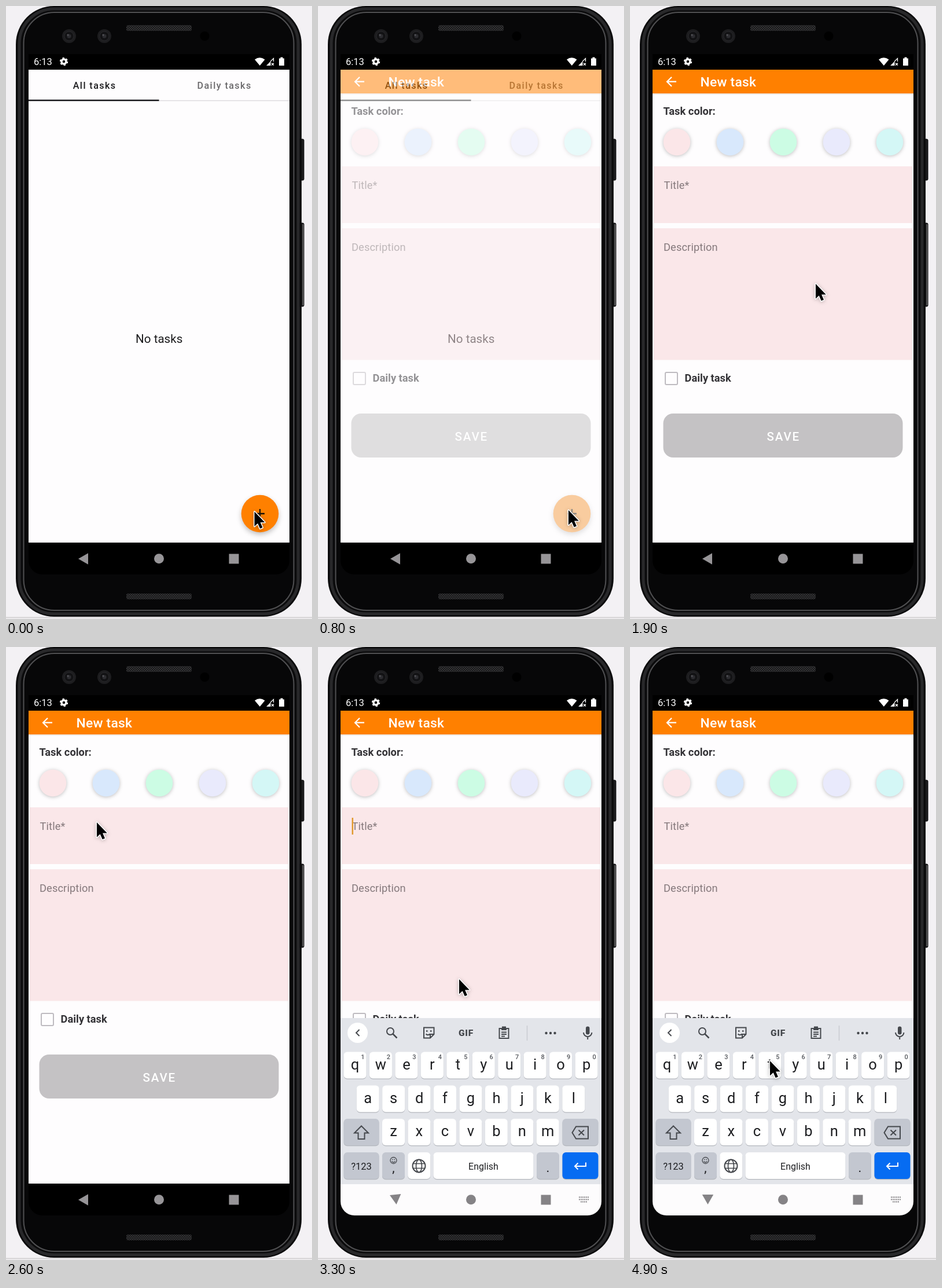
Animation, 529 px wide and 1059 px high, one loop 5 s. Source, as an HTML page:

```html
<!DOCTYPE html>
<html lang="en">
<head>
<meta charset="utf-8">
<title>Task app</title>
<style>
  html, body { margin: 0; width: 100%; height: 100%; overflow: hidden; background: #f3f1f4; }
  svg { display: block; width: 100%; height: 100%; }
  text { font-family: Roboto, sans-serif; white-space: pre; }
  .medium { font-weight: 500; }
  .bold { font-weight: 700; fill: #333236; }
  .tab { font-size: 16.1px; letter-spacing: 1.43px; }
  .hint { font-size: 18.3px; letter-spacing: .1px; fill: #85797c; }
  .mid { text-anchor: middle; }
  .line { fill: none; stroke: #45484d; stroke-width: 2; }
  .lift { filter: drop-shadow(0 1.5px 3px rgba(0, 0, 0, .25)); }
  .fab { filter: drop-shadow(0 4px 4px rgba(0, 0, 0, .24)); }
</style>
</head>
<body>
<svg viewBox="0 0 529 1059">
  <defs>
    <pattern id="mesh" width="4" height="4" patternUnits="userSpaceOnUse">
      <rect width="4" height="4" fill="#171718"/>
      <path d="M0 0h2v2h-2zM2 2h2v2h-2z" fill="#343436"/>
    </pattern>
    <clipPath id="glass"><path d="M39 83H490V958a24 24 0 0 1-24 24H63a24 24 0 0 1-24-24Z"/></clipPath>
    <g id="lens">
      <circle r="12" fill="#1d1d1f"/>
      <circle r="8" fill="#121214" stroke="#29292c"/>
      <circle r="3.5" fill="#2c2c30"/>
      <circle cx="-2" cy="-2" r="1.5" fill="#56565b"/>
    </g>
  </defs>

  <!-- Phone body -->
  <path d="M0 1056.5H529" stroke="#d3d1d4" stroke-width="2"/>
  <g fill="#1c1c1e" stroke="#050506">
    <rect x="508" y="230" width="7" height="71" rx="2"/>
    <rect x="508" y="375" width="7" height="144" rx="2"/>
  </g>
  <path d="M513.500 377V517" stroke="#78787a" stroke-width="1.500"/>
  <g fill="none">
    <rect x="17" y="0" width="494" height="1055" rx="66" fill="#0b0b0c"/>
    <rect x="23" y="5" width="482" height="1045" rx="60" stroke="#28282a" stroke-width="5"/>
    <rect x="30.500" y="11" width="467" height="1033" rx="53" fill="#070708" stroke="#505052" stroke-width="2"/>
  </g>
  <rect x="208" y="33" width="113" height="10" rx="3" fill="url(#mesh)"/>
  <rect x="208" y="1015" width="113" height="10" rx="3" fill="url(#mesh)"/>
  <use href="#lens" x="109" y="52"/>
  <use href="#lens" x="170" y="52"/>
  <circle cx="343.500" cy="52" r="8" fill="#000"/>

  <g clip-path="url(#glass)">
    <rect x="39" y="83" width="451" height="899"/>

    <!-- Status bar -->
    <g fill="#fff">
      <text x="48" y="102" font-size="16.5">6:13</text>
      <circle cx="100" cy="96" r="4" fill="none" stroke="#fff" stroke-width="3.4"/>
      <circle cx="100" cy="96" r="6" fill="none" stroke="#fff" stroke-width="2.4" stroke-dasharray="3.1 3.183"/>
      <path d="M430 92.500Q438.500 86 447.500 92.500L438.800 103ZM450 103L457.500 95.500V103ZM472 90.500h2.500v-2h4v2h2.500V103h-9Z"/>
      <path d="M457 96L462.500 90.500V96M459 98.500l4 4m0-4l-4 4" fill="none" stroke="#fff" stroke-width="1.300"/>
    </g>

    <!-- Task list -->
    <rect x="39" y="110" width="451" height="817" fill="#fefdfe"/>
    <text class="tab medium" x="115.700" y="143" fill="#1b1b1d">All tasks</text>
    <text class="tab medium" x="330.500" y="143" fill="#6a696b">Daily tasks</text>
    <path d="M264 163.500H490" stroke="#dddbde" stroke-width="1.500"/>
    <path d="M39 163H264.500" stroke="#17171a" stroke-width="2.300"/>
    <text class="mid" x="264.700" y="582" font-size="20.600" fill="#1b1b1d">No tasks</text>
    <circle class="fab" cx="439" cy="877" r="32.300" fill="#ff8000"/>
    <circle id="press" cx="439" cy="877" r="32.300" fill="#d8dde0"/>
    <path d="M431 877H447M439 869V885" stroke="#1b1205" stroke-width="2.300"/>

    <!-- New task form -->
    <g id="form">
      <rect x="39" y="110" width="451" height="817" fill="#fefdfe"/>
      <path d="M39 152H490" stroke="#eee8e8" stroke-width="2"/>
      <rect x="39" y="110" width="451" height="41" fill="#ff8000"/>
      <path d="M80 130.700H64.500M72 122.700L64 130.700L72 138.700" fill="none" stroke="#fff" stroke-width="2.200"/>
      <text class="medium" x="121.500" y="139.300" font-size="22.900" letter-spacing=".2" fill="#fff">New task</text>
      <text class="bold" x="57.500" y="188.300" font-size="18.300">Task color:</text>
      <g id="swatches"></g>
      <path d="M40.500 277H489V375H40.500ZM40.500 384H489V611.500H40.500Z" fill="#fae7e9"/>
      <text class="hint" x="58.500" y="315.500">Title*</text>
      <text class="hint" x="58" y="423">Description</text>
      <rect id="caret" x="58.500" y="295" width="2.500" height="29" fill="#e09a30"/>
      <rect x="61" y="633" width="21" height="21" rx="2" fill="none" stroke="#bebbc0" stroke-width="2"/>
      <text class="bold" x="94.500" y="649" font-size="18.300">Daily task</text>
      <rect x="57.500" y="704" width="414" height="76" rx="17" fill="#c4c2c4"/>
      <text class="medium" x="236.500" y="750.500" font-size="20.600" letter-spacing="1.800" fill="#fff">SAVE</text>
    </g>

    <!-- Keyboard -->
    <g id="keyboard">
      <rect x="39" y="641" width="451" height="288" fill="#e3e5ea"/>
      <rect x="39" y="928" width="451" height="420" fill="#fdfcfd"/>
      <circle cx="68.500" cy="666.500" r="17.500" fill="#fff"/>
      <g class="line">
        <path d="M71.500 661L66 666.500L71.500 672"/>
        <circle cx="125" cy="664" r="6"/>
        <path d="M129.500 668.500L136.500 675.500" stroke-width="2.500"/>
        <path d="M183 657.500H200.500V669L194 675.500H183ZM200 669H194V675M186.500 668.500Q190 672 193.500 668.500"/>
        <path d="M187 663.500h2.500m4.500 0h2.500" stroke-width="2.500"/>
        <path d="M313.500 659H329.500V676H313.500ZM317 661H326M317 665.500H326M317 669H326M317 672.500H323"/>
        <path d="M318 657.500H325" stroke-width="4"/>
        <path d="M361.500 654V680" stroke="#c9ccd1" stroke-width="1.500"/>
        <path d="M459 666a7.200 7.200 0 0 0 14.400 0M466.200 673V678"/>
      </g>
      <rect x="463" y="655.500" width="6.500" height="14" rx="3.250" fill="#45484d"/>
      <g fill="#45484d">
        <circle cx="394.500" cy="667" r="2.200"/><circle cx="402" cy="667" r="2.200"/><circle cx="409.500" cy="667" r="2.200"/>
      </g>
      <text class="mid" x="256" y="672" font-size="15.500" font-weight="900" letter-spacing=".8" fill="#45484d">GIF</text>
      <g id="keys"></g>
      <g class="line">
        <path d="M75 827.500L87 839.500H80.500V850H69.500V839.500H63Z"/>
        <path d="M446 828.500H467V849.500H446L439.500 839ZM450.500 834.500L460 843.500M460 834.500L450.500 843.500"/>
        <circle cx="130.500" cy="887" r="5.500" stroke-width="1.300"/>
        <path d="M127.500 888.500Q130.500 892 133.500 888.500M128 885.500h1.500m2 0h1.500" stroke-width="1.300"/>
        <circle cx="174.500" cy="896.500" r="11"/>
        <ellipse cx="174.500" cy="896.500" rx="5" ry="11" stroke-width="1.700"/>
        <path d="M164.500 892.500H184.500M164.500 900.500H184.500" stroke-width="1.700"/>
        <path d="M463 890.500V897H444M449.500 891.500L444 897L449.500 902.500" stroke="#fff"/>
      </g>
    </g>

    <!-- Navigation -->
    <g id="nav">
      <path id="back" d="M-9.500 0L7.500-9.700V9.700Z"/>
      <circle cx="264.500" cy="954.800" r="8.500"/>
      <rect x="385.500" y="946.500" width="17" height="17"/>
      <path id="switcher" d="M451 950.500H468M451 954.500H468M454 958.500H465" fill="none" stroke="#858386" stroke-width="2" stroke-dasharray="2 1"/>
    </g>
  </g>

  <path id="pointer" class="lift" d="M0 0V25.500L5.700 20.200L9.700 29.300L14 27.500L10.100 18.500H17.800Z"
    stroke="#fff" stroke-width="3" paint-order="stroke" stroke-linejoin="round"/>
</svg>

<script>
  const $ = id => document.getElementById(id);

  $("swatches").innerHTML = ["#fbe6e8", "#d8e8fc", "#ccfce4", "#e9eafc", "#d4f7f6"]
    .map((c, i) => `<circle class="lift" cx="${81 + 92 * i}" cy="235" r="23.3" fill="${c}"/>`).join("");

  const GRAY = "#c3c7d0";

  function key(x, y, w, label = "", fill = "#fff", size = 25.5, drop = 30) {
    return `<rect x="${x}" y="${y + 1.2}" width="${w}" height="46" rx="6" fill="#b4b7bd"/>
      <rect x="${x}" y="${y}" width="${w}" height="46" rx="6" fill="${fill}"/>
      <text class="mid" x="${x + w / 2}" y="${y + drop}" font-size="${size}" fill="#1d1e21">${label}</text>`;
  }

  function letters(row, x, y) {
    return [...row].map((c, i) => key(x + 44.45 * i, y, 39, c)).join("");
  }

  $("keys").innerHTML =
    letters("qwertyuiop", 44.5, 699.5) + letters("asdfghjkl", 66.7, 757.5) + letters("zxcvbnm", 111, 815) +
    [..."1234567890"].map((c, i) =>
      `<text class="mid medium" x="${77.5 + 44.45 * i}" y="712" font-size="11" fill="#55585d">${c}</text>`).join("") +
    key(44.5, 815, 61, "", GRAY) + key(422.5, 815, 62, "", GRAY) +
    key(44.5, 873, 61, "?123", GRAY, 16.5, 30) + key(111, 873, 39, ",", GRAY, 22, 34) +
    key(155.3, 873, 39) + key(199.5, 873, 173, "English", "#fff", 16, 29.5) +
    key(378, 873, 39, ".", GRAY, 22, 34) + key(422.5, 873, 62, "", "#066cf2");

  // Linear interpolation through [time, value, ...] points
  function track(points, t) {
    const n = points.findIndex(p => p[0] > t);
    if (n === 0) return points[0].slice(1);
    if (n < 0) return points.at(-1).slice(1);
    const a = points[n - 1], b = points[n], k = (t - a[0]) / (b[0] - a[0]);
    return a.slice(1).map((v, i) => v + (b[i + 1] - v) * k);
  }

  const pointerPath = [
    [0, 429.5, 873.5], [200, 433, 871], [1500, 433, 871], [1600, 422, 815], [1700, 394, 690],
    [1800, 356, 570], [1900, 321, 480], [2000, 287, 431], [2200, 227, 380], [2400, 178, 326],
    [2600, 157, 303], [3100, 157, 303], [3200, 196, 425], [3300, 244, 574], [3400, 261, 650],
    [3600, 262, 712], [4000, 250, 724], [4400, 242, 715]
  ];
  const formFade = [[600, 0], [700, .25], [800, .52], [900, .83], [1000, 1]];
  const fabPress = [[500, 0], [700, .25]];
  const keyboardSlide = [[3000, 300, 0], [3100, 250, .16], [3200, 45, .85], [3300, 0, 1]];
  const backTurn = [[3100, 0, 955], [3200, -55, 954], [3300, -96, 953.5], [3400, -90, 953.5]];

  function draw(t) {
    const [x, y] = track(pointerPath, t);
    $("pointer").setAttribute("transform", `translate(${x} ${y})`);

    $("form").setAttribute("opacity", track(formFade, t)[0]);
    $("press").setAttribute("opacity", track(fabPress, t)[0]);
    const blinkOn = t >= 3000 && Math.floor((t - 3000) / 500) % 2 === 0;
    $("caret").setAttribute("opacity", blinkOn ? 1 : 0);

    const [dy, alpha] = track(keyboardSlide, t);
    $("keyboard").setAttribute("transform", `translate(0 ${dy})`);
    $("keyboard").setAttribute("opacity", alpha);

    const [angle, backY] = track(backTurn, t);
    $("nav").setAttribute("fill", alpha > .5 ? "#858386" : "#979598");
    $("back").setAttribute("transform", `translate(134.5 ${backY}) rotate(${angle})`);
    $("switcher").setAttribute("opacity", t >= 3100 ? 1 : 0);
  }

  const LOOP = 5000, STEP = 100;
  const start = performance.now();

  function tick() {
    const t = (performance.now() - start) % LOOP;
    draw(Math.floor(t / STEP) * STEP);
    requestAnimationFrame(tick);
  }
  tick();
</script>
</body>
</html>
```
